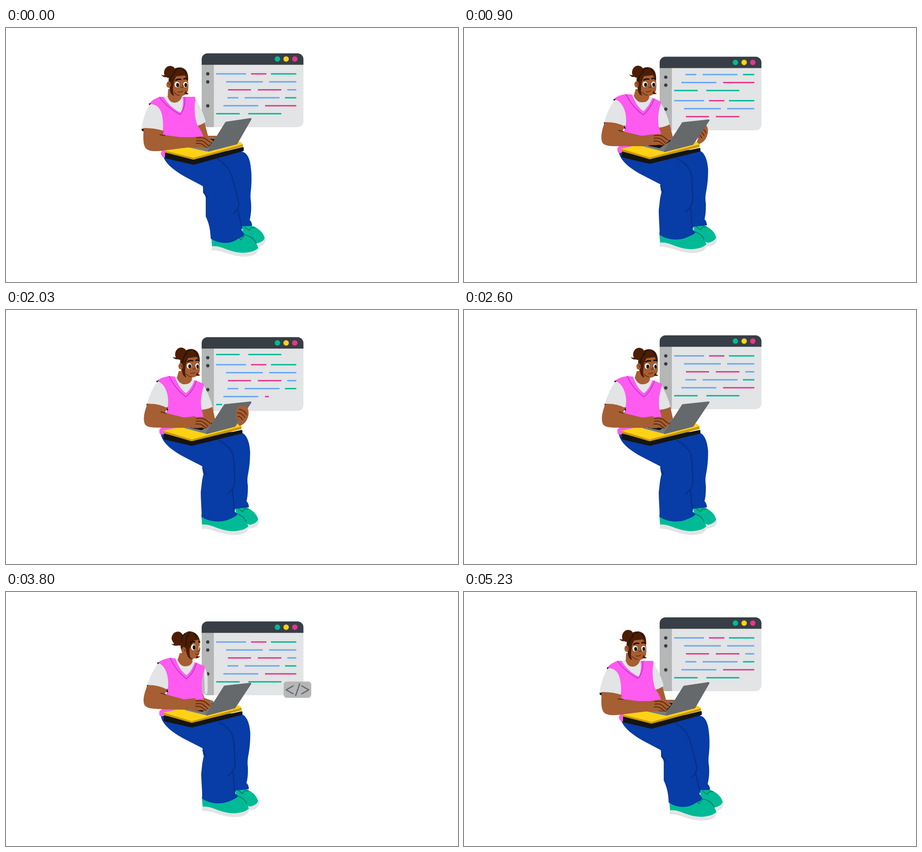
Write an HTML page with a canvas that moves like this. It is 998 px wide and 561 px high and loops after 5.31 s.

```html
<!DOCTYPE html>
<html lang="en">
<head>
<meta charset="utf-8">
<title>Coding on a laptop</title>
<style>
html, body { margin: 0; width: 100%; height: 100%; overflow: hidden; background: #fff; }
canvas { display: block; width: 100%; height: 100%; }
</style>
</head>
<body>
<canvas width="998" height="561"></canvas>
<script>
const ctx = document.querySelector('canvas').getContext('2d');
const LOOP = 5310;
const C = {
  dark: '#373e46', panel: '#e2e4e6', grey: '#b5b6b6', green: '#00ba96', yellow: '#ffd215',
  pink: '#e8358c', blue: '#65a6f8', vest: '#ff5bf0', seam: '#c138c9', skin: '#a65e33',
  line: '#5f2a0a', hair: '#4d1d02', black: '#141414', jeans: '#083ca6', crease: '#062f80',
  shoe: '#0a7f68', amber: '#c7980c', screen: '#65696c', base: '#777b7e'
};

// Motion: [time, value] pairs, eased between neighbours.
const MOVES = {
  lean: [[0, 0], [650, 1], [900, 1], [1200, 2], [1650, 2], [2000, 1.35], [2700, 1.35], [3200, 1.5], [3700, 1.6], [4250, 2.4], [4650, 2.4], [5200, 0]],
  arm: [[0, 0], [650, 1], [900, 1], [1200, 2], [1600, 2], [1950, 1.05], [3300, 1.05], [4250, 1.35], [4650, 1.35], [5200, 0]],
  legs: [[0, 0], [320, 1], [650, 2], [3650, 2], [4300, 1], [4750, 0]],
  headX: [[0, 0], [650, 22], [900, 22], [1200, 31.5], [1650, 31.5], [2000, 25.5], [2700, 25.5], [3200, 23], [3700, 25], [4250, 33], [4650, 33], [5200, 0]],
  headY: [[0, 0], [900, -.5], [1250, 1], [2000, -1], [3200, 0], [4300, 1.5], [5200, 0]],
  turn: [[950, 0], [1200, .12], [2750, .12], [3150, 1], [4750, 1], [5150, 0]],
  handX: [[0, 0], [900, -1], [1200, -6], [1600, -6], [1950, -1], [3500, -1], [4300, -3], [5200, 0]],
  handY: [[0, 0], [900, -6], [1300, -5], [2000, -2], [3500, -2], [4300, -6], [5200, 0]],
  grip: [[550, 0], [950, 1], [2450, 1], [2800, 0]],
  down: [[2750, 0], [3150, 1], [4750, 1], [5150, 0]],
  badgeX: [[2750, 640], [3230, 687], [3300, 690], [3620, 643.5], [4740, 643.5], [4960, 691], [5190, 640]],
  open: [[3300, 0], [3620, 1], [4740, 1], [4960, 0]]
};
const SCROLL = [[0, 0], [900, 58.5], [1300, 81], [1450, 85], [1750, 86], [2050, 95], [2550, 110.5]];

const smooth = k => (1 - Math.cos(Math.PI * k)) / 2;
function track(t, keys, ease = smooth) {
  if (t <= keys[0][0]) return keys[0][1];
  for (let i = 1; i < keys.length; i++) {
    const [a, u] = keys[i - 1], [b, v] = keys[i];
    if (t < b) return u + (v - u) * ease((t - a) / (b - a));
  }
  return keys[keys.length - 1][1];
}

const NUM = /-?\d+(\.\d+)?/g;
function mix(a, b, k) {
  const n = b.match(NUM);
  let i = 0;
  return a.replace(NUM, v => (+v + (n[i++] - v) * k).toFixed(2));
}
function blend(list, k) {
  const i = Math.min(Math.floor(k), list.length - 2);
  return mix(list[i], list[i + 1], k - i);
}
function fill(d, color, round = 0) {
  const p = new Path2D(d);
  ctx.fillStyle = color;
  ctx.fill(p);
  if (round) stroke(d, color, round);
}
function stroke(d, color, width) {
  ctx.strokeStyle = color;
  ctx.lineWidth = width;
  ctx.stroke(new Path2D(d));
}
function oval(x, y, rx, ry, color) {
  ctx.fillStyle = color;
  ctx.beginPath();
  ctx.ellipse(x, y, rx, ry, 0, 0, 7);
  ctx.fill();
}
function box(x, y, w, h, r, color) {
  ctx.fillStyle = color;
  ctx.beginPath();
  ctx.roundRect(x, y, w, h, r);
  ctx.fill();
}
function shifted(x, y, draw) {
  ctx.save();
  ctx.translate(x, y);
  draw();
  ctx.restore();
}

// Code rows: [from, to, colour]; TYPED holds when each row is written again.
const ROWS = [
  [[464, 530, 'blue'], [541, 575, 'pink'], [585, 641, 'green']],
  [[486, 567, 'blue'], [581, 641, 'blue']],
  [[490, 541, 'pink'], [556, 608, 'pink'], [621, 641, 'blue']],
  [[489, 513, 'blue'], [527, 604, 'blue'], [616, 641, 'green']],
  [[480, 557, 'blue'], [572, 641, 'pink']],
  [[464, 516, 'green'], [535, 608, 'green']]
];
const TYPED = [0, 240, 500, 820, 1740, 2015];

function drawRow(row, y, end) {
  for (const [a, b, color] of row) {
    if (end <= a) continue;
    ctx.fillStyle = C[color];
    ctx.fillRect(a, y - 1.5, Math.min(b, end) - a, 3);
  }
}

function drawWindow(top, t) {
  shifted(0, top, () => {
    ctx.beginPath();
    ctx.roundRect(432, 0, 224.7, 163, 13);
    ctx.clip();
    box(432, 0, 225, 163, 0, C.panel);
    box(432, 20, 27, 143, 0, C.grey);
    const shift = track(t, SCROLL, k => k);
    ROWS.forEach((row, i) => {
      const y = 45.4 + 17.6 * i - shift;
      drawRow(row, y, 700);
      drawRow(row, y + 110.5, 464 + (t - TYPED[i]) * .375);
    });
    box(432, 0, 225, 25.3, 0, C.dark);
    for (const y of [45.4, 63.1, 116]) oval(445.5, y, 3.7, 3.7, C.dark);
    ['green', 'yellow', 'pink'].forEach((c, i) => oval(599.3 + 19.2 * i, 12.7, 6, 6, C[c]));
  });
}

function drawBadge(m, top) {
  const k = m.open, w = 24 + 37 * k;
  shifted(m.badgeX, top + 144.5 + 6.3 * k, () => {
    box(-w / 2, -18, w, 36, 7, C.grey);
    stroke(`M${5 * k} ${k - 14}L${-4 * k} ${14 - k}`, C.screen, 2.6);
    if (k > .02) for (const s of [-k, k]) stroke(`M${9.5 * s} -8.5L${25 * s} .3L${9.5 * s} 9`, C.screen, 2.6);
  });
}

// Lower body poses: stretched, passing, tucked.
const PANTS = [
  'M346 281C352 300 372 316 400 331L434 349C436 352 434 358 436 365C442 372 441 375 441 385L441 416C447 430 451 440 452 465C470 477 495 479 513 465Q525 461 526 455L520 446L521 438L543 437Q544 430 538 424C541 412 542 400 541 385Q539 375 540 365C542 350 543 330 541 312Q538 275 520 273L460 270Z',
  'M341 270C345 292 372 313 400 326L437 344C440 350 436 354 441 362C440 372 439 375 438 385L437 402C441 420 443 435 442 453C460 466 485 468 502 458Q516 456 519 450L513 443L514 434L536 432Q538 425 530 419C535 408 536 400 535 385Q536 375 537 365C541 345 542 325 542 305Q539 268 520 263L460 262Z',
  'M342 275C346 296 372 314 400 328L433 345C435 350 433 354 436 362C434 372 433 375 432 385L430 402C430 420 432 440 432 457C450 469 478 471 497 460Q509 456 511 451L505 445L506 439L536 436Q537 429 531 422C534 412 534 400 534 388Q532 376 534 365C538 345 539 330 539 312Q536 275 518 270L456 268Z'];
const CREASE = [
  'M467 290C497 306 499 330 505 350L514 385Q515 400 502 410M512 402L521 442M436 362L447 376',
  'M466 282C499 299 503 320 506 345L512 378Q512 394 497 402M508 394L513 437M439 350L446 362',
  'M470 288C502 305 503 320 504 348L505 380Q504 396 489 406M500 397L504 440M434 349L441 363'];
const NEAR_SHOE = [[0, 0], [1, -12], [2, -22]], NEAR_SHOE_Y = [[0, 0], [1, -7], [2, -8]];
const FAR_SHOE = [[0, 0], [1, -15], [2, -14.5]], FAR_SHOE_Y = [[0, 0], [1, -4.5], [2, -1.5]];
const PAD = [
  'M352 271L385 262L460 246L517 252L523 257L414 287Z',
  'M350 265L385 257L460 240L516 244L521 247L412 281Z',
  'M348 267L383 259L460 246L514 252L520 257L410 287Z'];
const PAD_SIDE = [
  'M351 271L414 287L523 257L523 262L414 291L351 275Z',
  'M350 265L412 280L521 247L521 252L412 284L350 269Z',
  'M348 267L410 286L520 257L520 263L410 290L348 272Z'];
const PAD_FOOT = [
  'M353 277L414 292L523 265L523 270L414 300L353 286Z',
  'M352 272L412 285L521 255L521 260L412 293L352 282Z',
  'M350 275L410 291L520 267L520 271L410 298L350 284Z'];
const BASE = [
  'M405 264L444 273L466 243L438 241Z',
  'M402 260L442 266L466 238L436 233Z',
  'M394 261L440 273L466 245L438 240Z'];
const KEYS = [
  'M428 262L446 264L461 246L442 244Z',
  'M425 256L445 258L458 240L440 238Z',
  'M408 260L432 265L458 248L436 244Z'];
const SCREEN = [
  'M486 209L540 201L509 255L447 271Z',
  'M481 200L536 191L502 249L445 264Z',
  'M483 210L540 204L505 256L443 272Z'];

// Upper body poses: upright, leaning, leaning further.
const SLEEVE = [
  'M320 166C308 180 302 205 299 222Q325 220 348 228L350 190L340 165Z',
  'M334 157C322 172 315 190 310 208Q335 207 355 217L360 190L350 160Z',
  'M340 156C327 170 316 186 308 201Q332 202 349 215L360 190L354 162Z'];
const FAR_SLEEVE = [
  'M417 156Q432 175 441 207Q432 214 421 216L412 185Z',
  'M434 165Q447 185 454 213Q442 219 430 220L426 185Z',
  'M440 168Q452 190 459 216Q447 221 434 222L430 190Z'];
const SLEEVE_DOWN = 'M437 165Q447 178 445 200Q446 215 444 225Q439 226 433 225L428 188Z';
const FAR_ARM = [
  'M422 213L438 208L446 238L465 238L464 244L438 246Z',
  'M430 218L454 212L461 240L466 243L462 247L436 246Z',
  'M434 220L458 215L462 240L466 243L462 247L438 246Z'];
const ARM_DOWN = 'M430 222L435 224L438 234L458 241L456 245L434 243Z';
const VEST = [
  'M316 168Q322 158 339 152L348 152Q362 176 386 187Q393 172 390 152L417 152Q420 156 417 166C415 190 420 210 424 217Q434 230 437 245L380 280L348 286Q342 282 342 276Q350 262 345 240C348 222 348 195 340 180Q332 167 316 168Z',
  'M331 157Q338 149 357 146L371 147Q380 172 396 184Q409 172 416 154L434 162Q436 165 433 172C428 190 428 205 430 218Q435 230 437 245L380 275L341 276Q338 273 339 264Q352 255 347 240C360 220 360 195 354 180Q346 160 331 157Z',
  'M338 156Q345 149 366 145L376 147Q384 172 400 184Q413 172 417 156L440 164Q443 168 439 176C433 195 433 205 434 218Q436 230 438 245L380 272L340 273Q337 270 339 262Q352 255 347 240C360 220 360 200 356 182Q352 163 338 156Z'];
const SEAM = [
  'M339 153Q355 175 384 191Q396 178 395 153',
  'M358 147Q372 175 396 192Q410 180 420 157',
  'M365 146Q378 175 400 192Q416 180 421 157'];
const COLLAR = [
  'M345 153L358 150L388 151L394 152L388 188L370 182Z',
  'M366 148L378 147L410 152L417 156L396 188L380 176Z',
  'M372 148L384 147L413 154L420 157L400 188L384 176Z'];
const NECK = [
  'M358 135L357 152Q362 166 373 165Q384 164 389 151L388 135Z',
  'M379 135L375 150Q382 165 394 164Q406 164 409 154L410 135Z',
  'M386 135L381 150Q388 166 399 164Q410 163 413 154L414 135Z'];
const SHADE = [
  'M299 223L309 221L306 229L300 227ZM348 228L347 230L348 230ZM315 167L320 166L317 171Z',
  'M309 208L314 208L311 214L309 212ZM355 215L348 220L357 223ZM330 157L336 157L331 161Z',
  'M308 201L309 201L309 202L308 202ZM350 212L342 219L352 221ZM337 154L342 155L338 159Z'];
const ARM = [
  'M304 221C303 240 302 256 308 265C314 273 330 273 345 271L400 264L418 264L418 241L385 241L347 236L348 227Q325 220 304 221Z',
  'M311 208C303 228 301 245 306 254C311 261 325 261 345 261L396 261L417 258L417 235L392 238L350 228L355 217Q335 207 311 208Z',
  'M309 201C299 214 291 232 297 241C303 250 325 253 345 256L390 260L412 259L412 236L385 238L343 221L349 214Q330 202 309 201Z'];
const ELBOW = ['M340 236L351 237', 'M341 226L352 229', 'M334 219L345 222'];

// Head poses: facing front, turned to the side.
const HEAD = {
  bun: ['M349 101C348 90 356 82 365 84Q374 86 375 97L364 110Q352 112 349 101Z',
    'M340 103C339 93 348 85 357 87Q366 90 367 104L362 117Q345 120 340 103Z'],
  flick: ['M352 102Q349 107 343 103Q347 111 357 108Z', 'M346 112Q344 116 339 113Q344 120 356 117Z'],
  back: ['M359 120C358 100 368 87 384 87C397 88 403 98 402 114L400 125L362 138Z',
    'M360 122C358 102 366 87 380 86C392 87 400 95 402 106L398 122L364 136Z'],
  face: ['M366 108L400 104Q404 125 402 138Q398 151 381 151Q366 149 362 135Z',
    'M366 112L401 104Q404 126 401 136Q396 147 380 148Q366 146 364 135Z'],
  lock: ['M384 97C377 102 371 113 370 126Q367 140 371 150Q361 147 362 132Q361 102 374 94Z',
    'M397 95C391 104 386 112 380 125Q378 140 384 149Q374 144 372 130Q358 112 362 96Z'],
  fringe: ['M382 97Q393 99 398 110Q401 120 402 116Q404 98 390 90Z',
    'M388 96Q396 98 399 104Q402 112 402 106Q400 96 390 90Z'],
  tip: ['M397 138Q398 145 404 144Q400 149 394 145Z', 'M396 140Q399 143 404 140Q400 146 392 146Z'],
  strands: ['M363 117Q364 104 374 98M371 97Q376 90 384 89M391 92Q397 96 397 101',
    'M372 118Q370 98 381 89M361 108Q362 96 369 91M390 91Q394 94 394 100'],
  brows: ['M375 115.5Q379 112 386 113.5M393 112.5Q396 110.5 400 113', 'M382 111Q386 107.5 391 109.5M400 109Q401 108.5 402 110'],
  lines: ['M386 131Q393 133 391 126M380 141Q386 143 390 139M371 142Q376 148 383 149',
    'M396 131Q402 131 401 127M393 136Q396 138 400 136M382 145Q384 146 386 147']
};
const EYES = [
  [[377.8, 125, 5.4, 6.2], [388, 121, 5, 6.6], '#fff'], [[379, 126, 3.2, 4.4], [389.5, 121.5, 3.1, 4.8], C.black],
  [[396.2, 125, 4.8, 6.2], [401, 124, 1.2, 6], '#fff'], [[397, 126, 3.1, 4.4], [402, 125, .8, 4], C.black]
];

function drawHead(m) {
  shifted(m.headX, m.headY, () => {
    const k = m.turn, part = name => blend(HEAD[name], k);
    for (const name of ['bun', 'flick', 'back']) fill(part(name), C.hair);
    fill(part('face'), C.skin);
    for (const [a, b, color] of EYES) oval(...a.map((v, i) => v + (b[i] - v) * k), color);
    stroke(part('lines'), C.line, 1.5);
    for (const name of ['lock', 'fringe', 'tip']) fill(part(name), C.hair);
    stroke(part('strands'), C.black, 2);
    stroke(part('brows'), C.black, 3.2);
    const x = 359 + 8 * k, y = 125 + 3 * k;
    oval(x, y, 4.8, 7, C.skin);
    stroke(`M${x - 1} ${y - 3}Q${x + 3} ${y - 3} ${x + 2} ${y + 2}`, C.line, 1.3);
  });
}

function drawLegs(k) {
  const at = keys => track(k, keys, v => v);
  shifted(at(FAR_SHOE), at(FAR_SHOE_Y), () => {
    fill('M520 440L555 445L572 463Q576 470 569 478Q562 484 550 484L525 470Z', C.panel);
    fill('M520 434L544 437Q566 446 571 463Q570 472 553 476L525 465Z', C.green);
    stroke('M527 440L537 447L541 441L550 441', C.shoe, 2);
  });
  shifted(at(NEAR_SHOE), at(NEAR_SHOE_Y), () => {
    fill('M455 470L454 491C480 491 495 504 525 505Q557 505 558 486L540 470Z', C.panel);
    fill('M453 460L455 482C478 480 490 496 525 496.5Q548 495 557 486C553 470 538 458 526 455L480 450Z', C.green);
    stroke('M513 462L519 468L527 457Q546 461 552 475', C.shoe, 2);
  });
  fill(blend(PANTS, k), C.jeans);
  stroke(blend(CREASE, k), C.crease, 2.2);
}

function drawGrip(m) {
  shifted(6 - 80 * (1 - m.grip), 6 * (1 - m.grip), () => {
    ctx.translate(m.front ? -6 : 0, 0);
    fill('M514 213Q530 208 534 218Q538 228 533 240Q528 252 516 256L511 251Q514 245 514 242Q507 241 508 236Q506 231 509 228Q506 222 511 219Q509 214 514 213Z', C.skin);
    stroke('M515 219Q528 222 531 231M511 227Q522 228 527 237M512 235Q519 235 522 243', C.line, 2);
  });
}

function drawHand(x, y) {
  shifted(x, y, () => {
    fill('M410 242L421 240Q437 238 445 241L457 249Q458 254 453 253Q453 258 449 258Q448 265 443 265Q432 262 426 264L410 264Z', C.skin);
    stroke('M421 243Q434 241 441 245L451 253M421 249Q433 247 438 252L447 260M420 255Q432 254 436 259L443 264', C.line, 2);
  });
}

function drawPerson(m, t) {
  const body = list => blend(list, m.lean), seat = list => blend(list, m.legs);
  // The arm hangs from the shoulder, so extra lean carries it along.
  const carry = m.lean - m.arm;
  const limb = draw => shifted(5 * carry, -2 * carry, draw);
  drawLegs(m.legs);
  limb(() => fill(blend(SLEEVE, m.arm), C.panel));
  fill(mix(body(FAR_ARM), ARM_DOWN, m.down), C.skin);
  fill(mix(body(FAR_SLEEVE), SLEEVE_DOWN, m.down), C.panel);
  fill(body(COLLAR), C.panel);
  fill(body(NECK), C.skin);
  fill(body(VEST), C.vest);
  stroke(body(SEAM), C.seam, 2);
  drawHead(m);
  fill(seat(PAD_FOOT), C.black, 4);
  fill(seat(PAD), C.yellow, 1);
  fill(seat(PAD_SIDE), C.amber);
  fill(seat(BASE), C.base);
  fill(seat(KEYS), C.black, 1);
  if (m.grip > 0 && !m.front) drawGrip(m);
  fill(seat(SCREEN), C.screen, 4);
  if (m.front) drawGrip(m);
  limb(() => {
    fill(blend(SHADE, m.arm), C.black);
    fill(blend(ARM, m.arm), C.skin);
    stroke(blend(ELBOW, m.arm), C.line, 2);
  });
  drawHand(m.handX, m.handY + 1.2 * Math.sin(t / 5300 * Math.PI * 40));
}

function render(t) {
  const m = {};
  for (const name in MOVES) m[name] = track(t, MOVES[name]);
  m.front = t > 970 && t < 2450;
  const top = 60.65 - 4.75 * Math.cos(t / 2650 * Math.PI * 2);
  ctx.fillStyle = '#fff';
  ctx.fillRect(0, 0, 998, 561);
  ctx.lineCap = ctx.lineJoin = 'round';
  const out = t > 2750 && t < 5190, above = t > 3300 && t < 4960;
  if (out && !above) drawBadge(m, top);
  drawWindow(top, t);
  if (above) drawBadge(m, top);
  drawPerson(m, t);
}

// Pictures alternate between 30 and 70 ms, standing for even 50 ms steps.
const start = performance.now();
function tick() {
  const t = Math.max(0, performance.now() - start) % LOOP;
  const step = Math.min(105, Math.floor(t / 100) * 2 + (t % 100 >= 30 ? 1 : 0));
  render(step * 50);
  requestAnimationFrame(tick);
}
tick();
</script>
</body>
</html>
```
